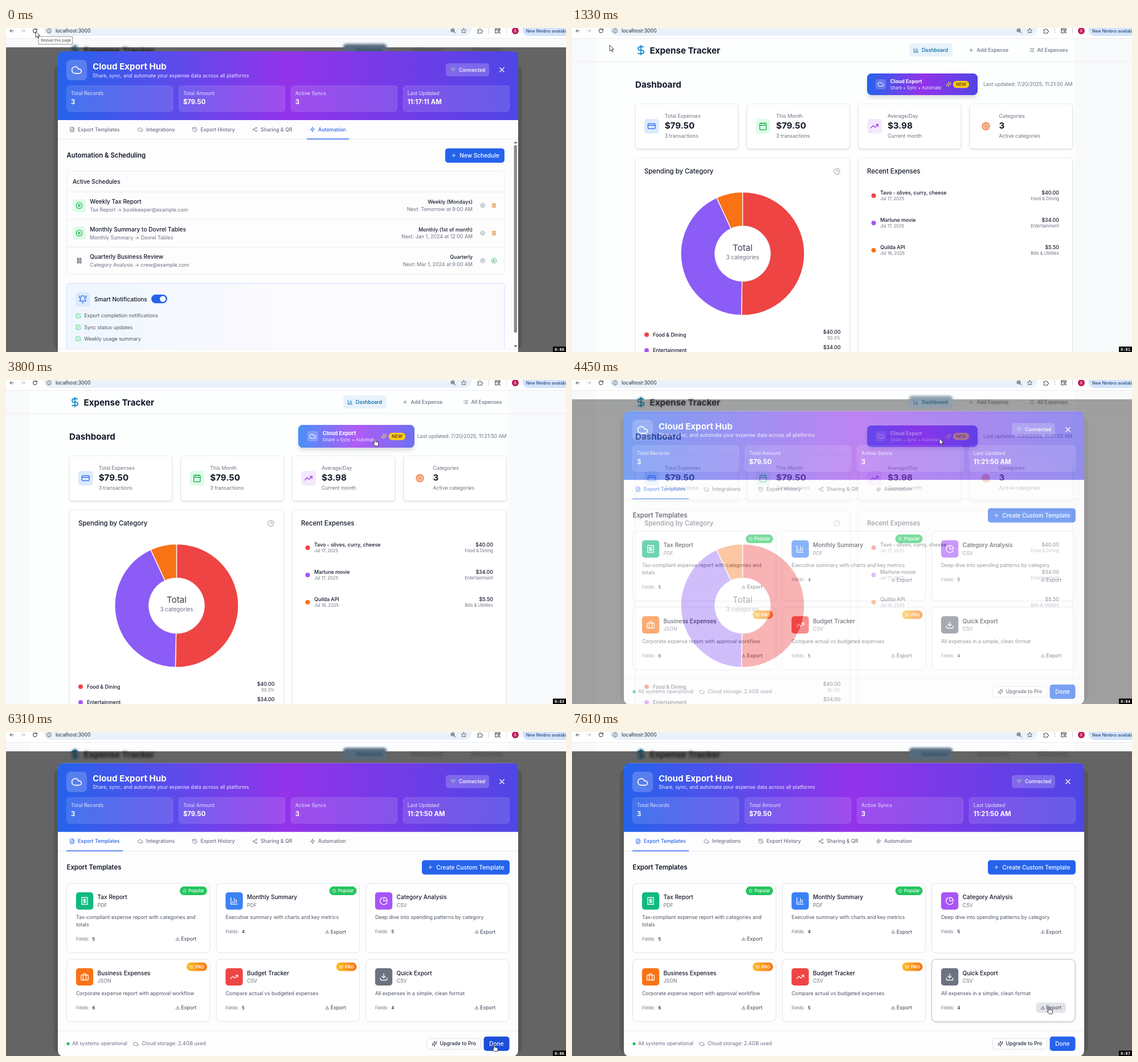
Recreate the animation shown at these times as an HTML page. Size 983 by 570 pixels, loop 8 s.

```html
<!DOCTYPE html>
<html lang="en">
<head>
<meta charset="utf-8">
<title>Expense Tracker</title>
<style>
  html, body { margin: 0; width: 100%; height: 100%; overflow: hidden; background: #f9fafb; }
  svg { display: block; }
  text { font-family: Inter, Roboto, sans-serif; white-space: pre; }
  .blur { filter: blur(2px); }
  .shade { filter: drop-shadow(0 1.5px 1px rgba(0,0,0,.16)); }
  .lift { filter: drop-shadow(0 5px 3px rgba(0,0,0,.12)); }
</style>
</head>
<body>
<svg id="stage" width="983" height="570" viewBox="0 0 983 570"></svg>
<script>
const ZOOM = 0.6316; // page zoom: CSS px to stage px
const INK = '#111827', TEXT = '#4b5563', GRAY = '#6b7280', LINE = '#e5e7eb';
const BLUE = '#2563eb', GREEN = '#16a34a';

const dot = (x, y, r) => `M${x - r} ${y}a${r} ${r} 0 1 0 ${2 * r} 0a${r} ${r} 0 1 0 ${-2 * r} 0`;
const box = (x, y, w, h) => `M${x + 2} ${y}h${w - 4}q2 0 2 2v${h - 4}q0 2-2 2h${4 - w}q-2 0-2-2v${4 - h}q0-2 2-2z`;
const teeth = () => Array.from({length: 8}, (_, i) => {
  const c = Math.cos(i * Math.PI / 4), s = Math.sin(i * Math.PI / 4);
  return `M${12 + 8 * c} ${12 + 8 * s}L${12 + 10.5 * c} ${12 + 10.5 * s}`;
}).join('');

// Icons on a 24 x 24 grid
const ICONS = {
  cloud: 'M17.5 19H9a7 7 0 1 1 6.71-9h1.79a4.5 4.5 0 1 1 0 9Z',
  close: 'M18 6 6 18M6 6l12 12',
  wifi: 'M12 20h.01M2 8.82a15 15 0 0 1 20 0M5 12.86a10 10 0 0 1 14 0M8.5 16.43a5 5 0 0 1 7 0',
  file: 'M15 2H6a2 2 0 0 0-2 2v16a2 2 0 0 0 2 2h12a2 2 0 0 0 2-2V7ZM14 2v6h6M10 9H8M16 13H8M16 17H8',
  history: 'M3 12a9 9 0 1 0 9-9 9.75 9.75 0 0 0-6.74 2.74L3 8M3 3v5h5M12 7v5l4 2',
  share: dot(18, 5, 3) + dot(6, 12, 3) + dot(18, 19, 3) + 'M8.6 13.5l6.8 4M15.4 6.5l-6.8 4',
  zap: 'M13 2 3 14h9l-1 8 10-12h-9z',
  plus: 'M5 12h14M12 5v14',
  play: dot(12, 12, 10) + 'M10 8l6 4-6 4z',
  pause: 'M6 4h4v16H6zM14 4h4v16h-4z',
  gear: dot(12, 12, 8) + dot(12, 12, 3) + teeth(),
  bell: 'M10.3 21a1.94 1.94 0 0 0 3.4 0M6 8a6 6 0 0 1 12 0c0 7 3 9 3 9H3s3-2 3-9M4 2C2.8 3.7 2 5.7 2 8M22 8c0-2.3-.8-4.3-2-6',
  check: 'M9 11l3 3L22 4M21 12v7a2 2 0 0 1-2 2H5a2 2 0 0 1-2-2V5a2 2 0 0 1 2-2h11',
  star: 'M12 2l3.1 6.3 6.9 1-5 4.8 1.2 6.9L12 17.8 5.8 21 7 14.1 2 9.3l6.9-1z',
  crown: 'M2 4l3 12h14l3-12-6 7-4-7-4 7zM5 20h14',
  bars: 'M3 3v18h18M18 17V9M13 17V5M8 17v-3',
  pie: 'M21.2 15.9A10 10 0 1 1 8 2.8M22 12A10 10 0 0 0 12 2v10z',
  brief: box(2, 7, 20, 14) + 'M16 21V5a2 2 0 0 0-2-2h-4a2 2 0 0 0-2 2v16',
  trend: 'M22 7l-8.5 8.5-5-5L2 17M16 7h6v6',
  load: 'M21 15v4a2 2 0 0 1-2 2H5a2 2 0 0 1-2-2v-4M7 10l5 5 5-5M12 15V3',
  receipt: 'M4 2v20l2-1 2 1 2-1 2 1 2-1 2 1 2-1 2 1V2l-2 1-2-1-2 1-2-1-2 1-2-1-2 1ZM16 8h-6a2 2 0 1 0 0 4h4a2 2 0 1 1 0 4H8M12 17.5v-11',
  spark: 'M12 2q1 6.5 3 8t7 2q-5 .5-7 2t-3 8q-1-6.500-3-8t-7-2q5-.5 7-2t3-8M20 3v4M22 5h-4M4 17v2M5 18H3',
  dollar: 'M12 2v20M17 5H9.500a3.500 3.500 0 0 0 0 7h5a3.500 3.500 0 0 1 0 7H6',
  list: 'M8 6h13M8 12h13M8 18h13M3 6h.01M3 12h.01M3 18h.01',
  card: box(2, 5, 20, 14) + 'M2 10h20',
  calendar: box(3, 4, 18, 18) + 'M16 2v4M8 2v4M3 10h18',
  target: dot(12, 12, 10) + dot(12, 12, 6) + dot(12, 12, 2),
  spinner: 'M21 12a9 9 0 1 1-6.22-8.56',
  reload: 'M21 12a9 9 0 1 1-9-9c2.5 0 4.900 1 6.700 2.700L21 8M21 3v5h-5',
  back: 'M20 12H4M11 19l-7-7 7-7',
  next: 'M4 12h16M13 5l7 7-7 7',
  info: dot(12, 12, 9) + 'M12 11v6M12 7v.5',
  zoom: dot(10, 10, 7) + 'M15 15l7 7M7 10h6M10 7v6',
  puzzle: 'M3 7h5a3 3 0 1 1 6 0h5v5a3 3 0 1 1 0 5v5H3v-5a3 3 0 0 0 0-6z',
  panel: 'M12 20H3V4h18v7M3 8h18' + dot(16, 15, 3) + 'M18 17l4 4',
};

const rect = (x, y, x2, y2, r, fill, more = '') =>
  `<rect x="${x}" y="${y}" width="${x2 - x}" height="${y2 - y}" rx="${r}" fill="${fill}" ${more}/>`;
const disc = (x, y, r, fill) => `<circle cx="${x}" cy="${y}" r="${r}" fill="${fill}"/>`;
const rule = (x, y, x2, fill = LINE) => rect(x, y, x2, y + .8, 0, fill);
const stroke = (color, w = .8) => `stroke="${color}" stroke-width="${w}"`;
const text = (x, y, s, size, fill, weight = 400, anchor = 'start', more = '') =>
  `<text x="${x}" y="${y}" font-size="${size * ZOOM}" fill="${fill}" font-weight="${weight}" text-anchor="${anchor}" ${more}>${s.replace(/&/g, '&amp;')}</text>`;
const icon = (name, x, y, size, color, w = 2) =>
  `<path d="${ICONS[name]}" transform="translate(${x - size / 2} ${y - size / 2}) scale(${size / 24})" fill="none" stroke="${color}" stroke-width="${w}" stroke-linecap="round" stroke-linejoin="round"/>`;
const group = (id, body, more = '') => `<g id="${id}" ${more}>${body}</g>`;
const gradient = (id, ...colors) => `<linearGradient id="${id}">` + colors.map((c, i) =>
  `<stop offset="${i / (colors.length - 1)}" stop-color="${c}"/>`).join('') + '</linearGradient>';

function browser() {
  const dark = '#3c4043';
  return rect(0, 0, 983, 18.5, 0, '#fff') + rect(66, -12, 817, 14, 13, '#e9f1fb') + rule(0, 18, 983, '#e3e6ea') +
    group('reloadHover', disc(51, 5, 9.5, '#dcdfe3')) +
    icon('back', 10, 5, 9, dark, 2.5) + icon('next', 30, 5, 9, '#b0b3b8', 2.5) + icon('reload', 51, 5, 9, dark, 2.8) +
    icon('info', 75.5, 5, 10, dark) + text(87, 8.3, 'localhost:3000', 13.8, '#25282c') +
    icon('zoom', 785, 5, 10, dark, 2.3) + icon('star', 803.5, 5, 10, dark) + icon('puzzle', 832, 5, 10, dark, 2.3) +
    rect(847, 0, 848, 10, 0, '#c8d6ec') + icon('panel', 863, 5, 11, dark, 2.3) + rect(878, 0, 879, 10, 0, '#c8d6ec') +
    disc(894, 5, 6, '#c2185b') + text(894, 7.5, 'A', 11, '#fff', 400, 'middle') +
    rect(907, -10, 1000, 14, 10, '#d3e3fd') + text(913, 8, 'New Nimbro available', 11.6, '#0b2a5c');
}

function header() {
  return rule(0, 58.6, 983) + icon('dollar', 121, 39, 20, '#0284c7') + text(136.5, 45, 'Expense Tracker', 24, INK, 700) +
    rect(592, 27, 668, 50, 5, '#e8f2fb') + icon('bars', 604, 39, 10, '#0369a1') + text(614, 42, 'Dashboard', 14, '#0369a1', 500) +
    icon('plus', 700.5, 39, 10, GRAY) + text(710.5, 42, 'Add Expense', 14, GRAY, 500) +
    icon('list', 807, 39, 10, GRAY) + text(816.5, 42, 'All Expenses', 14, GRAY, 500);
}

function slice(from, to, color) {
  const at = (r, f) => `${299.5 + r * Math.sin(f * 2 * Math.PI)} ${397 - r * Math.cos(f * 2 * Math.PI)}`;
  const big = +(to - from > .5);
  return `<path d="M${at(108.5, from)}A108.5 108.5 0 ${big} 1 ${at(108.5, to)}L${at(48.5, to)}A48.5 48.5 0 ${big} 0 ${at(48.5, from)}Z" fill="${color}" ${stroke('#fff', 1.3)}/>`;
}

function exportButton() {
  return group('exportButton',
    rect(518, 80, 712, 118, 7.5, 'url(#head)', 'class="lift"') + rect(518, 80, 712, 118, 7.5, 'url(#hot)', 'id="hotFill"') +
    rect(533, 90, 551, 108, 4.5, 'rgba(255,255,255,.2)') + icon('cloud', 542, 99, 12, '#fff') +
    text(558.5, 97, 'Cloud Export', 14, '#fff', 700) + text(558.5, 108, 'Share • Sync • Automate', 12, '#f1ecff') +
    icon('spark', 661, 99.3, 10, '#fde047') + rect(669, 93, 697, 105.5, 6, '#facc15') +
    text(683, 102, 'NEW', 12, '#713f12', 600, 'middle'));
}

function dashboard() {
  const card = (x, x2, y, y2) => rect(x + .4, y + .4, x2 - .4, y2 - .4, 5, '#fff', `class="shade" ${stroke(LINE)}`);
  const stats = [
    ['Total Expenses', '$79.50', '3 transactions', 'card', '#dbeafe', BLUE],
    ['This Month', '$79.50', '3 transactions', 'calendar', '#dcfce7', GREEN],
    ['Average/Day', '$3.98', 'Current month', 'trend', '#f3e8ff', '#9333ea'],
    ['Categories', '3', 'Active categories', 'target', '#fff', '#ea580c'],
  ].map(([label, value, note, glyph, tint, color], i) => {
    const x = 111 + i * 195.6;
    return card(x, x + 181, 133, 213) + rect(x + 16, 160, x + 41.5, 185.5, 5, tint) + icon(glyph, x + 28.7, 172.7, 15.2, color) +
      text(x + 51.7, 157.8, label, 14, GRAY) + text(x + 51.7, 177, value, 24, INK, 700) + text(x + 51.7, 193.2, note, 14, GRAY);
  }).join('');
  const legend = [['Food & Dining', '$40.00', '50.3%', '#ef4444'], ['Entertainment', '$34.00', '42.8%', '#a855f7']]
    .map(([name, sum, share, color], i) => {
      const y = 539.5 + i * 27.7;
      return disc(131, y, 4, color) + text(142, y + 3.2, name, 14, INK, 500) +
        text(471.5, y - 2, sum, 14, INK, 500, 'end') + text(471.5, y + 8.8, share, 12, GRAY, 400, 'end');
    }).join('');
  const recent = [
    ['Tavo - olives, curry, cheese', 'Jul 17, 2025', '$40.00', 'Food & Dining', '#ef4444'],
    ['Marlune movie', 'Jul 17, 2025', '$34.00', 'Entertainment', '#a855f7'],
    ['Quilda API', 'Jul 16, 2025', '$5.50', 'Bills & Utilities', '#f97316'],
  ].map(([name, date, sum, kind, color], i) => {
    const y = 295 + i * 48;
    return disc(529.5, y, 4, color) + text(541, y - 2.5, name, 14, INK, 500) + text(541, y + 8.3, date, 12, GRAY) +
      text(855, y - 2.5, sum, 14, INK, 500, 'end') + text(855, y + 8.3, kind, 12, GRAY, 400, 'end');
  }).join('');
  return rect(42, 19, 882, 570, 0, '#fdfefe') + header() + text(111, 104.5, 'Dashboard', 24, INK, 700) +
    text(878.5, 102.2, 'Last updated: 7/20/2025, 11:21:50 AM', 14, GRAY, 400, 'end', 'id="updated"') +
    stats + exportButton() + card(111, 488, 228, 590) + card(502, 879, 228, 590) +
    text(127, 256, 'Spending by Category', 18, INK, 500) + icon('pie', 465, 252, 12.6, '#9ca3af') +
    slice(0, .503, '#ef4444') + slice(.503, .931, '#8b5cf6') + slice(.931, 1, '#f97316') +
    `<circle cx="299.5" cy="397" r="48.7" fill="#fff" ${stroke(LINE)}/>` +
    text(299.5, 392.3, 'Total', 24, '#374151', 400, 'middle') + text(299.5, 406.8, '3 categories', 15.6, GRAY, 400, 'middle') +
    legend + text(518, 256, 'Recent Expenses', 18, INK, 500) + recent;
}

const loading = () => group('loadingHead', header(), 'transform="translate(4.5 0)"') +
  group('spinner', icon('spinner', 499.3, 115.700, 33.500, '#0284c7', 2)) +
  text(499.3, 144.6, 'Loading your expenses...', 14, GRAY, 400, 'middle');

function backdrop() {
  return rect(0, 34, 983, 570, 0, '#646464') +
    `<g class="blur">${rect(592, 28, 668, 49, 5, '#566b7e')}${text(136.5, 45, 'Expense Tracker', 24, '#161616', 700)}${icon('dollar', 121, 39, 20, '#123f55', 3)}${text(614, 42, 'Dashboard', 14, '#1d3c52', 500)}${text(711, 42, 'Add Expense', 14, '#444', 500)}${text(817, 42, 'All Expenses', 14, '#444', 500)}</g>` +
    rect(84, 62, 906, 568, 16, '#575757');
}

function modal(id, dy, tab, time, body) {
  const tabs = [
    ['file', 111, 'Export Templates', 106, 205], ['cloud', 231, 'Integrations'], ['history', 326.5, 'Export History'],
    ['share', 432, 'Sharing & QR'], ['zap', 533, 'Automation', 528, 602],
  ].map(([glyph, x, name, from, to], i) => {
    const color = i === tab ? BLUE : GRAY;
    return icon(glyph, x + 5, 178.500, 10, color) + text(x + 15, 181.5, name, 14, color, 500) +
      (i === tab ? rect(from, 194.6, to, 196, 0, BLUE) : '');
  }).join('');
  const stats = [['Total Records', '3'], ['Total Amount', '$79.50'], ['Active Syncs', '3'], ['Last Updated', time]]
    .map(([label, value], i) => {
      const x = 106.500 + i * 196.9;
      return rect(x, 101.5, x + 186.5, 147, 5, 'rgba(255,255,255,.12)', stroke('rgba(255,255,255,.16)')) +
        text(x + 7.5, 118.2, label, 14, '#e4e6fd') + text(x + 7.5, 134.4, value, 18, '#fff', 700);
    }).join('');
  return group(id, backdrop() + `<g transform="translate(0 ${dy})">` + rect(91, 41, 899, dy ? 557 : 600, 10, '#fdfdfe') +
    `<path d="M91 162V51q0-10 10-10H889q10 0 10 10V162Z" fill="url(#head)"/>` +
    rect(106, 56, 142, 92, 7.5, 'rgba(255,255,255,.2)') + icon('cloud', 124, 74, 20, '#fff') +
    text(152, 73, 'Cloud Export Hub', 24, '#fff', 700) +
    text(152, 86.7, 'Share, sync, and automate your expense data across all platforms', 14, '#eceafe') +
    rect(772, 62, 848, 85, 5, 'rgba(255,255,255,.2)') + icon('wifi', 785, 73, 10, '#86efac') +
    text(795, 76.500, 'Connected', 14, '#fff', 500) + icon('close', 870.5, 73.5, 15, '#fff') +
    stats + rule(91, 195.6, 899) + tabs + '</g>' + body);
}

function bigButton(x, x2, y, label, id = '') {
  return rect(x, y, x2, y + 25.3, 5, BLUE, id) + icon('plus', x + 15, y + 12.5, 10, '#fff') + text(x + 25.3, y + 16.1, label, 16, '#fff', 500);
}

function automation() {
  const rows = [
    ['Weekly Tax Report', 'Tax Report → bookkeeper@example.com', 'Weekly (Mondays)', 'Tomorrow at 9:00 AM', true],
    ['Monthly Summary to Dovrel Tables', 'Monthly Summary → Dovrel Tables', 'Monthly (1st of month)', 'Jan 1, 2024 at 12:00 AM', true],
    ['Quarterly Business Review', 'Category Analysis → crew@example.com', 'Quarterly', 'Mar 1, 2024 at 9:00 AM', false],
  ].map(([name, flow, when, next, on], i) => {
    const y = 312.3 + i * 48.5;
    return rule(106, y - 24.3, 875) + rect(117, y - 11.4, 140, y + 11.4, 4.5, on ? '#dcfce7' : '#fdfdfe') +
      icon(on ? 'play' : 'pause', 128.5, y, 12.6, on ? GREEN : TEXT) +
      text(147.3, y - 3, name, 16, INK, 500) + text(147.3, y + 10.8, flow, 14, GRAY) +
      text(819, y - 3.200, when, 14, INK, 500, 'end') + text(819, y + 9.6, 'Next: ' + next, 14, GRAY, 400, 'end') +
      icon('gear', 836.7, y, 10, '#9ca3af') + icon(on ? 'pause' : 'play', 856.7, y, 10, on ? '#d97706' : GREEN);
  }).join('');
  const checks = ['Export completion notifications', 'Sync status updates', 'Weekly usage summary'].map((s, i) => {
    const y = 506.3 + i * 20.1;
    return icon('check', 127, y, 10, '#22c55e') + text(137.3, y + 3.100, s, 14, TEXT);
  }).join('');
  return text(106.5, 227.8, 'Automation & Scheduling', 18, INK, 600) + bigButton(771, 875, 211.7, 'New Schedule') +
    rect(106.4, 251.9, 875, 433.6, 5, '#fdfdfe', stroke(LINE)) + text(117, 273.600, 'Active Schedules', 16, INK, 500) + rows +
    rect(106.4, 449.4, 875, 590, 5, 'url(#smart)', stroke('#c3d9fb')) + rect(122, 465, 147.3, 490, 5, '#dbeafe') +
    icon('bell', 134.7, 477.300, 15, BLUE) + text(155, 480.800, 'Smart Notifications', 16, INK, 500) +
    rect(255, 469, 283, 484.2, 7.600, BLUE) + disc(275.3, 476.600, 5.200, '#fff') + checks +
    rect(91, 564.500, 899, 570, 0, '#fff') + rule(91, 564.5, 899) +
    rect(891.7, 206, 897, 536, 2.6, '#8b8b8b') + '<path d="M891.500 203l3-4 3 4zM891.500 558l3 4 3-4z" fill="#6b6b6b"/>';
}

function badge(x, y, popular) {
  return rect(x - (popular ? 48 : 36), y, x, y + 15.2, 7.6, popular ? '#22c55e' : 'url(#pro)') +
    icon(popular ? 'star' : 'crown', x - (popular ? 39.500 : 27), y + 7.6, 7.600, '#fff') +
    text(x - 5, y + 10.3, popular ? 'Popular' : 'PRO', 12, '#fff', popular ? 500 : 600, 'end');
}

function templates() {
  const cards = [
    ['Tax Report', 'PDF', 'Tax-compliant expense report with categories and|totals', 5, 'receipt', '#10b981', 'popular'],
    ['Monthly Summary', 'PDF', 'Executive summary with charts and key metrics', 4, 'bars', '#3b82f6', 'popular'],
    ['Category Analysis', 'CSV', 'Deep dive into spending patterns by category', 5, 'pie', '#a855f7'],
    ['Business Expenses', 'JSON', 'Corporate expense report with approval workflow', 6, 'brief', '#f97316', 'pro'],
    ['Budget Tracker', 'CSV', 'Compare actual vs budgeted expenses', 5, 'trend', '#ef4444', 'pro'],
    ['Quick Export', 'CSV', 'All expenses in a simple, clean format', 4, 'load', '#6b7280'],
  ].map(([name, type, about, fields, glyph, color, mark], i) => {
    const x = 106.5 + i % 3 * 262.5, row = Math.floor(i / 3), y = 266.4 + row * 133.6, lines = about.split('|');
    const base = y + 84.900 + (lines.length - 1) * 12.6, bottom = row ? 509.4 : 388.8, last = i === 5;
    const edge = (c, more) => rect(x, y, x + 251.500, bottom, 7.5, '#fff', stroke(c, 1) + more);
    return edge('#dfe2e7', '') + (last ? edge('#c4c8cf', ' class="shade" id="cardHover"') : '') +
      rect(x + 16.400, y + 15.600, x + 46.700, y + 46, 5, color) + icon(glyph, x + 31.500, y + 30.8, 15.2, '#fff') +
      text(x + 54, y + 28, name, 16, INK, 500) + text(x + 54, y + 41.4, type, 14, GRAY) +
      lines.map((s, n) => text(x + 16.400, y + 62.800 + n * 12.6, s, 14, TEXT)).join('') +
      text(x + 16.400, base + 2.700, 'Fields:', 12, GRAY) + text(x + 45, base + 2.700, String(fields), 12, INK, 500) +
      (last ? rect(815, 476, 867, 494, 4.500, '#e2e4e9', 'id="exportHover"') : '') +
      icon('load', x + 194.800, base, 7.600, '#374151') + text(x + 200.700, base + 3.2, 'Export', 14, '#374151') +
      (mark ? badge(x + 246.500, y + 5.400, mark === 'popular') : '');
  }).join('');
  return text(106.5, 241.700, 'Export Templates', 18, INK, 600) + bigButton(730, 884, 225.4, 'Create Custom Template') + cards +
    rule(91, 525.500, 899) + disc(109, 548.4, 2.6, '#22c55e') + text(116.3, 551.2, 'All systems operational', 14, GRAY) +
    icon('cloud', 228, 548.500, 10, GRAY) + text(238.3, 551.2, 'Cloud storage: 2.4GB used', 14, GRAY) +
    rect(738.400, 539.2, 833, 558, 4.500, '#fff', stroke('#d1d5db')) + icon('spark', 752, 548.500, 10, INK) +
    text(761.500, 551.3, 'Upgrade to Pro', 14, '#1f2937', 500) +
    rect(838.600, 535.700, 883.600, 561, 5, BLUE, 'id="done"') + text(861, 552, 'Done', 16, '#fff', 500, 'middle');
}

const pointer = `fill="#fff" ${stroke('#111', .8)} stroke-linejoin="round"`;
const $ = id => document.getElementById(id);
$('stage').innerHTML = '<defs>' + gradient('head', BLUE, '#9333ea', '#4f46e5') + gradient('hot', '#4a90f7', '#b05cf6', '#6d70f3') +
  gradient('pro', '#fbbf24', '#f97316') + gradient('smart', '#eff6ff', '#fbfaff', '#fbfaff') + '</defs>' +
  rect(0, 0, 983, 570, 0, '#f9fafb') + group('loading', loading()) + group('dashboard', dashboard()) +
  modal('automation', 0, 4, '11:17:11 AM', automation()) + modal('templates', 13.8, 0, '11:21:50 AM', templates()) + browser() +
  group('tip', rect(57, 15, 116.5, 28.500, 0, '#fff', stroke('#777')) + text(61.300, 24.2, 'Reload this page', 10.6, '#444')) +
  rect(960, 560.500, 983, 570, 0, '#000') +
  `<text id="clock" x="971.5" y="567.8" text-anchor="middle" font-size="7" font-weight="700" fill="#fff" style="font-family:'DejaVu Sans Mono',monospace"></text>` +
  `<path id="arrow" d="M0 0V10.500L2.500 8.2 4.2 12 5.800 11.3 4.2 7.600H7.500Z" ${pointer}/>` +
  `<path id="hand" d="M3.200 8.500V1.600a1 1 0 0 1 2 0V5.500l3.800.9q1.600.4 1.400 2L9.800 13H4.600L1 8.600q-.4-1.300 1-1z" ${pointer}/>`;

// Pointer stops: time, then x, y and shape (none while hidden)
const stops = [
  [0, 52, 6, 'arrow'], [1330, 66, 30, 'arrow'], [1460], [2040, 105, 223, 'arrow'], [2450, 403.500, 114.500, 'arrow'],
  [2600, 446, 115, 'arrow'], [2720, 488, 117, 'arrow'], [2870, 499, 113, 'arrow'], [2970, 508, 112, 'arrow'],
  [3120, 540, 107, 'hand'], [3250, 575, 105, 'hand'], [3400, 610, 104, 'hand'], [3530, 635, 104, 'hand'],
  [3800, 643.500, 103, 'hand'], [3930, 641, 102, 'hand'], [4020], [4300, 639.500, 97, 'hand'], [4450, 645, 103, 'arrow'],
  [4720, 770, 300, 'arrow'], [4850, 896, 536, 'arrow'], [4990, 775, 541, 'hand'], [5090, 850, 552, 'hand'],
  [5240, 824, 556, 'arrow'], [5370, 866, 550, 'hand'], [5510, 817, 540, 'hand'], [5640, 868, 550, 'hand'],
  [5790, 850, 545, 'hand'], [5920, 867, 552, 'hand'], [6070, 853, 552, 'hand'], [6170, 866, 552, 'hand'],
  [6310, 853, 549, 'hand'], [6430, 866, 552, 'hand'], [6580, 833, 488, 'hand'], [6710, 827.500, 493, 'hand'],
  [6970, 833, 482.500, 'hand'], [7480, 833, 483, 'hand'],
];
const ticks = [800, 1890, 2870, 3930, 4990, 6070, 7230];
const latest = (list, t) => list.filter(s => s[0] <= t).pop();
const show = (id, on) => $(id).style.display = on ? '' : 'none';

function frame() {
  const t = performance.now() % 8000;
  const within = (a, b) => t >= a && t < b;
  show('automation', t < 800);
  show('tip', t < 800);
  show('reloadHover', within(800, 1330));
  show('loading', within(800, 1330));
  show('dashboard', t >= 1330);
  show('templates', within(4450, 6710) || t >= 6970);
  $('templates').style.opacity = within(4450, 4580) ? .6 : 1;

  const step = latest([[800], [920], [1050], [1180]], Math.max(t, 800))[0];
  $('spinner').setAttribute('transform', `rotate(${(step - 920) * .36} 499.3 115.7)`);

  const hot = within(3120, 4450), size = !hot ? 1 : t < 3250 ? 1.025 : 1.05;
  show('hotFill', hot);
  $('exportButton').setAttribute('transform', `translate(615 99) scale(${size}) translate(-615 -99)`);
  $('updated').textContent = `Last updated: 7/20/2025, 11:21:${t < 4450 ? 50 : 53} AM`;

  const onExport = within(6580, 6710) || t >= 6970;
  show('cardHover', onExport);
  show('exportHover', onExport);
  $('done').setAttribute('fill', within(5790, 6580) ? '#1d4ed8' : BLUE);
  $('clock').textContent = '0:0' + ticks.filter(s => s <= t).length;

  const [, x, y, shape] = latest(stops, t);
  for (const id of ['arrow', 'hand']) {
    show(id, id === shape);
    if (id === shape) $(id).setAttribute('transform', `translate(${x} ${y})`);
  }
  requestAnimationFrame(frame);
}
frame();
</script>
</body>
</html>
```
